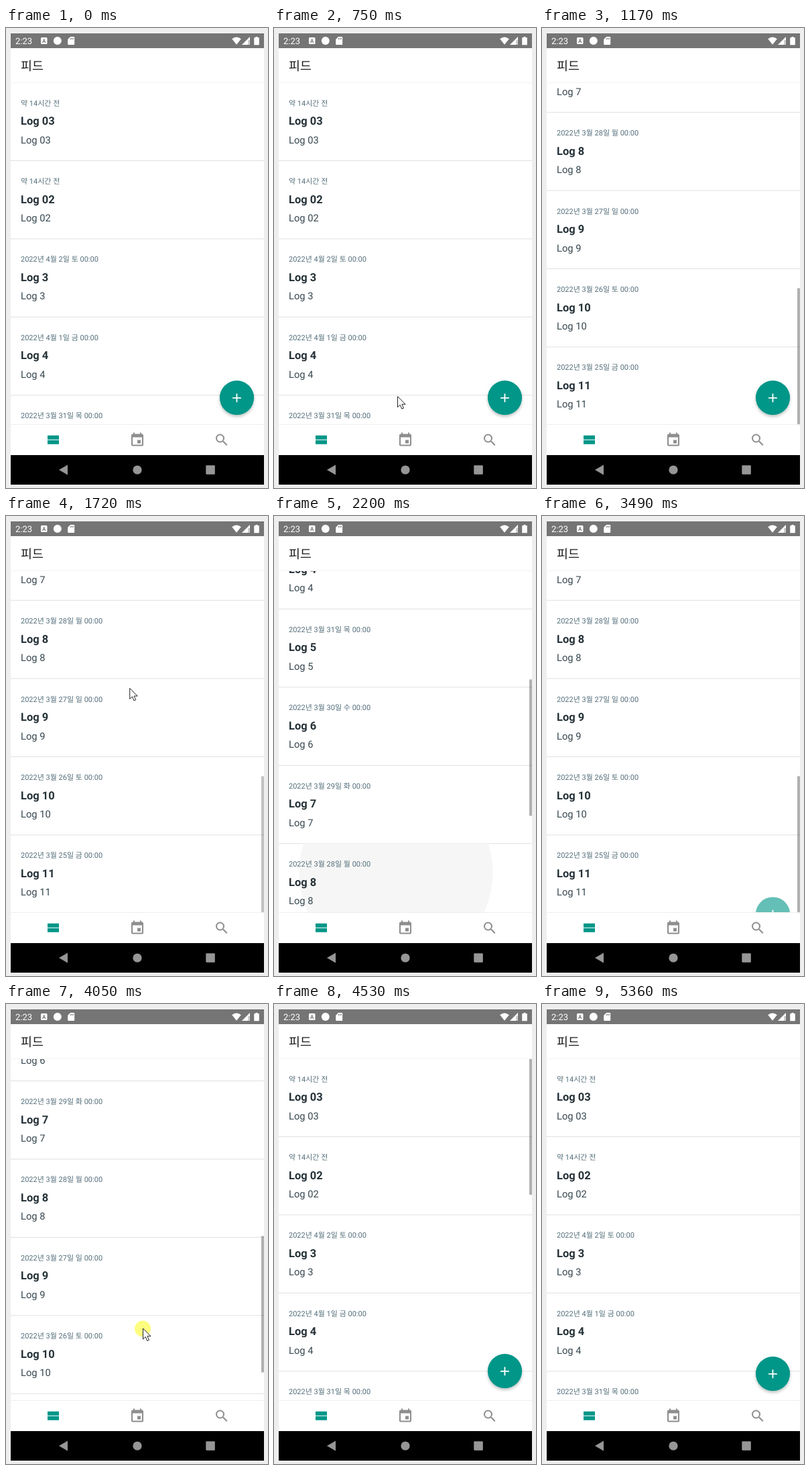
Animation of 391x685 px, one loop 5560 ms. Source, as an HTML page:

```html
<!DOCTYPE html>
<html lang="ko">
<head>
<meta charset="utf-8">
<title>피드</title>
<style>
  html, body { margin: 0; width: 100%; height: 100%; overflow: hidden; background: #eee; }
  svg { display: block; width: 391px; height: 685px; }
  text { font-family: Roboto, 'Noto Sans CJK KR', 'Noto Sans CJK', sans-serif; text-rendering: geometricPrecision; }
  .date { font-size: 11px; fill: #546e7a; }
  .title { font-size: 16.5px; font-weight: 700; fill: #263238; }
  .body { font-size: 14.7px; fill: #37474f; }
</style>
</head>
<body>
<svg viewBox="0 0 391 685">
  <defs>
    <clipPath id="view"><rect x="7" y="81" width="378" height="509.5"/></clipPath>
    <clipPath id="row"><rect x="7" width="378" height="116"/></clipPath>
    <filter id="shadow" x="-30%" y="-30%" width="160%" height="170%">
      <feDropShadow dx="0" dy="2.5" stdDeviation="2.2" flood-color="#000" flood-opacity=".25"/>
    </filter>
  </defs>
  <rect width="391" height="685" fill="#eee"/>
  <rect x="7" y="8" width="378" height="672" fill="#fff"/>

  <g clip-path="url(#view)">
    <g id="list"></g>
    <rect id="thumb" x="381" width="4" height="203" fill="#000" fill-opacity=".31"/>
    <g id="fab">
      <circle cx="344.5" cy="550.6" r="25.6" fill="#009688" filter="url(#shadow)"/>
      <path transform="translate(333.4 539.8) scale(.92)" fill="#fff" d="M19 13h-6v6h-2v-6H5v-2h6V5h2v6h6v2z"/>
    </g>
  </g>

  <rect x="7" y="30" width="378" height="51" fill="#fff"/>
  <rect x="7" y="81" width="378" height="1" fill="#f3f3f3"/>
  <text x="22" y="63" font-size="18.4" fill="#1c1c1e">피드</text>

  <rect x="7" y="8" width="378" height="22" fill="#757575"/>
  <g fill="#fff">
    <text x="14" y="23.8" font-size="13">2:23</text>
    <rect x="52" y="14" width="9.5" height="10" rx="1.5"/>
    <text x="56.8" y="22" font-size="8" font-weight="700" text-anchor="middle" fill="#757575">A</text>
    <circle cx="76.8" cy="19" r="6"/>
    <path d="M96 13h5.2q1 0 1 1v10q0 1-1 1h-8q-1 0-1-1v-7z"/>
    <path d="M96.3 15v2.2M98.3 15v2.2M100.3 15v2.2" stroke="#757575"/>
    <path d="M337.2 16.2q6.8-5.4 13.6 0L344 24.8z"/>
    <path d="M364 13v12h-12z"/>
    <path d="M361 18v7h3v-7z" fill="#757575" fill-opacity=".35"/>
    <path d="M372.5 13h3v1.3h2.3v10.9h-7.6V14.3h2.3z"/>
  </g>

  <rect x="7" y="590" width="378" height="46" fill="#fff"/>
  <rect x="7" y="590" width="378" height="1" fill="#efefef"/>
  <path transform="translate(58 601.7)" fill="#009688" d="M4 18h17v-6H4v6zM4 5v6h17V5z"/>
  <g fill="#8e8e8f">
    <path transform="translate(184 601.5)" d="M17 12h-5v5h5v-5zM16 1v2H8V1H6v2H5c-1.1 0-2 .9-2 2v14c0 1.1.9 2 2 2h14c1.1 0 2-.9 2-2V5c0-1.1-.9-2-2-2h-1V1h-2zm3 18H5V8h14v11z"/>
    <g transform="translate(310 601.5)">
      <circle cx="9.5" cy="9.5" r="5.5" fill="none" stroke="#8e8e8f" stroke-width="2"/>
      <path d="M13.2 14.7l1.5-1.5.8.8 5 5-1.5 1.5-5-5z"/>
    </g>
  </g>

  <rect x="7" y="636" width="378" height="44" fill="#000"/>
  <g fill="#969696">
    <path d="M92 650.5v15L79 658z"/>
    <circle cx="196" cy="658" r="6.6"/>
    <rect x="298.3" y="651.3" width="13.5" height="13.5" rx="1"/>
  </g>

  <g id="cursor">
    <circle id="touch" r="12" fill="#fdfd80"/>
    <path d="M.5-.3v16l3.7-3.5 2.6 6 2.7-1.2-2.6-5.7H12z" fill="#fff" stroke="#222" stroke-linejoin="round"/>
  </g>
</svg>
<script>
const LOOP = 5560, IDLE = 270, STEP = 68.6, LAST = 74;
const ROW = 116.45, TOP = 81, END = 770.6, DROP = 108;
const $ = id => document.getElementById(id);
const set = (id, attrs) => Object.entries(attrs).forEach(([k, v]) => $(id).setAttribute(k, v));
const clamp = v => Math.min(1, Math.max(0, v));
const mix = (a, b, f) => a + (b - a) * f;
const smooth = f => f * f * (3 - 2 * f);
const easeOut = f => 1 - (1 - f) ** 3;

// Feed rows
const label = i => i < 2 ? '0' + (3 - i) : String(i + 1);
const dateText = i => {
  if (i < 2) return '약 14시간 전';
  const d = new Date(Date.UTC(2022, 3, 4 - i));
  return `2022년 ${d.getUTCMonth() + 1}월 ${d.getUTCDate()}일 ${'일월화수목금토'[d.getUTCDay()]} 00:00`;
};
const row = i => `<g transform="translate(0 ${(TOP + i * ROW).toFixed(2)})">
  ${i === 7 ? '<g clip-path="url(#row)"><circle id="ripple" cx="182" cy="43" fill="#f6f6f6"/></g>' : ''}
  <text class="date" x="22" y="34.5">${dateText(i)}</text>
  <text class="title" x="22" y="63.1">Log ${label(i)}</text>
  <text class="body" x="22" y="90.5">Log ${label(i)}</text>
  ${i < 10 ? '<rect x="7" y="116" width="378" height="1" fill="#e0e0e0"/>' : ''}</g>`;
$('list').innerHTML = Array.from({ length: 11 }, (_, i) => row(i)).join('');

// Flings alternate between going down to the end and back up
const FLING = 310, PRESS = 60;
const flings = [845, 2042, 3060, 3971];
const scrollAt = t => END * flings.reduce((y, s, i) => y + (i % 2 ? -1 : 1) * smooth(clamp((t - s) / FLING)), 0);

// The pointer glides to a spot, presses, then drags the list from time `drag`
const strokes = [
  { enter: 265, from: [222, 642], to: [184, 549], drag: flings[0] },
  { enter: 1630, from: [178, 330], to: [188, 212], drag: flings[1] },
  { enter: 2760, from: [195, 620], to: [199, 450], drag: flings[2] },
  { enter: 3560, from: [190, 220], to: [204, 378], drag: flings[3] },
  { enter: 4590, from: [210, 575], to: [344, 705], drag: 5430 }
];

// Underdamped spring from 0 to 1
function spring(ms) {
  if (ms <= 0) return 0;
  const s = ms / 1000, w = 10.45, d = 11;
  return 1 - Math.exp(-d * s) * (Math.cos(w * s) + d / w * Math.sin(w * s));
}

function draw(t) {
  const y = scrollAt(t);
  set('list', { transform: `translate(0 ${-y.toFixed(2)})` });

  const bar = Math.max(...flings.map(s => t > s ? clamp((s + 1100 - t) / 300) : 0));
  set('thumb', { y: TOP + y * 306.5 / END, opacity: bar });

  // The button leaves once the end is reached and returns on the way up
  const hide = flings.reduce((h, s, i) => h + (i % 2 ? -spring(t - s - 255) : spring(t - s - 355)), 0);
  set('fab', { transform: `translate(0 ${(hide * DROP).toFixed(2)})`, opacity: clamp(1 - hide) });

  const grow = clamp((t - flings[1]) / FLING);
  set('ripple', { r: 198 * grow ** .43, opacity: clamp((1 - grow) * 2) });

  const s = strokes.find(s => t >= s.enter && t < s.drag + 110);
  set('cursor', { visibility: s ? 'visible' : 'hidden' });
  if (!s) return;
  const f = easeOut(clamp((t - s.enter) / (s.drag - 120 - s.enter)));
  const pull = scrollAt(s.drag) - scrollAt(Math.max(t, s.drag));
  set('cursor', { transform: `translate(${mix(s.from[0], s.to[0], f)} ${mix(s.from[1], s.to[1], f) + pull})` });
  set('touch', { opacity: t >= s.drag - PRESS ? 1 : 0 });
}

function held(t) {
  return t < IDLE ? 0 : IDLE + Math.min(LAST, Math.floor((t - IDLE + 8) / STEP)) * STEP;
}

const start = performance.now();
function tick() {
  draw(held((performance.now() - start) % LOOP));
  requestAnimationFrame(tick);
}
tick();
</script>
</body>
</html>
```
